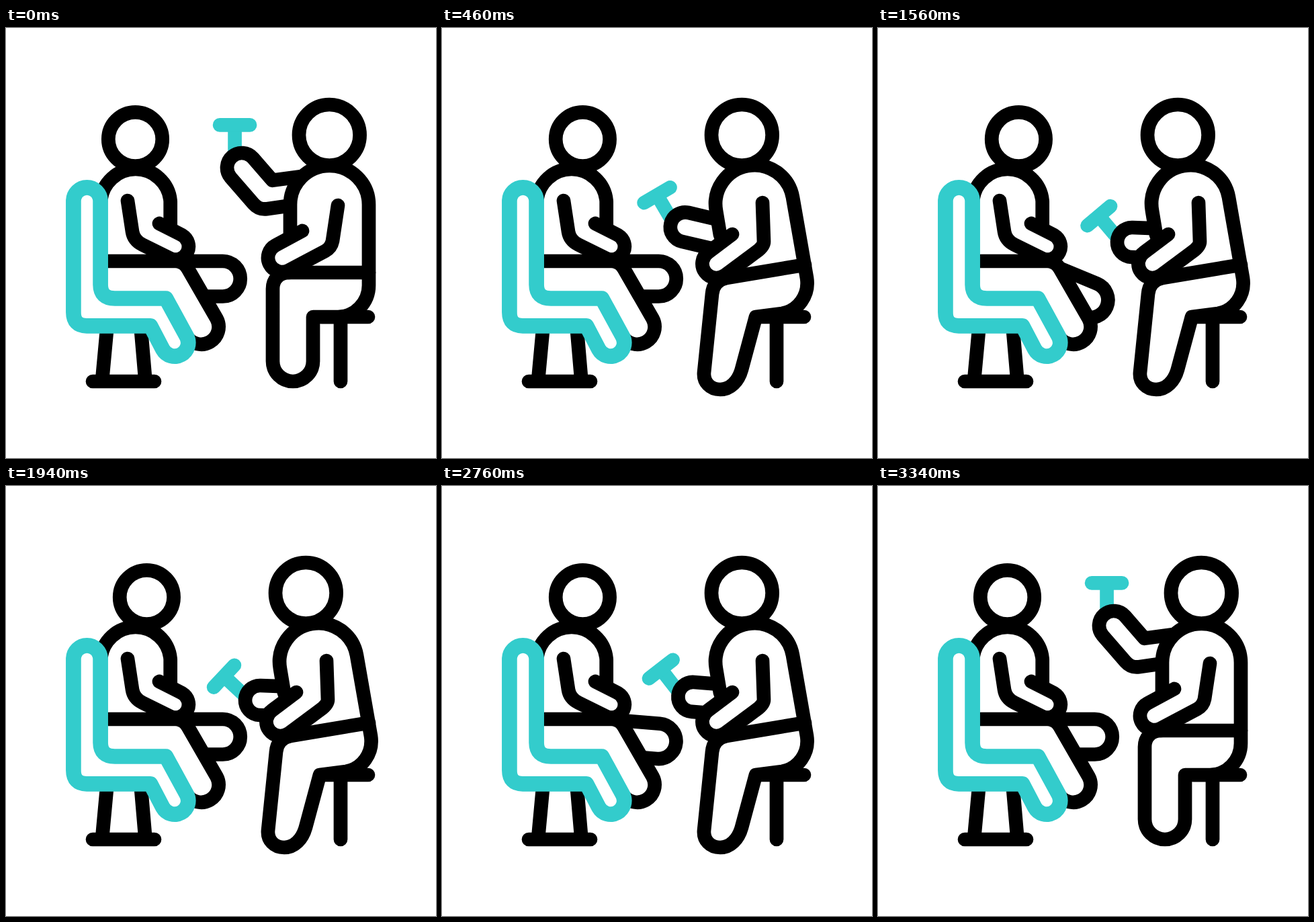
These frames come from a looping animation (640x640 px, 3.6 s). An HTML page:

```html
<!DOCTYPE html>
<html lang="en">
<head>
<meta charset="utf-8">
<title>Knee reflex test</title>
<style>
  html, body { margin: 0; width: 100%; height: 100%; overflow: hidden; background: #fff; }
  svg { display: block; width: 100%; height: 100%; }
  path, circle { fill: #fff; stroke: #000; stroke-width: 20.7; stroke-linecap: round; stroke-linejoin: round; }
  .line { fill: none; }
  .teal { stroke: #3cc; }
  .chair { stroke-width: 22.7; }
  .stem { stroke-linecap: butt; }
</style>
</head>
<body>
<svg viewBox="0 0 640 640">
  <!-- patient -->
  <path class="line" d="M150 450L143.5 520M201 450L207 520M129 526H221"/>
  <path class="line" id="kickLeg" d="M255 347H322.5A26 26 0 0 1 322.5 399.5H270"/>
  <path class="line" d="M141 258A52 52 0 0 1 244.7 258V298"/>
  <path d="M150 347H252Q264 347 270.5 358L313.5 432.5A26 26 0 0 1 268.5 458.5L238 405H150"/>
  <path d="M181 257L188 303Q190 316 203 322.5L245.6 343.5A19.5 19.5 0 0 0 262.4 308.5L228 291"/>
  <circle id="patientHead" cy="165.5" r="40.2"/>
  <path class="teal chair" d="M100.4 257.5A20.1 20.1 0 0 1 140.6 257.5V382Q140.6 402.5 162 402.5H238L268.7 458.7A20.2 20.2 0 0 1 233.3 478.2L215 443.3H120Q100.4 443.3 100.4 423Z"/>
  <!-- doctor -->
  <path class="line" d="M470 430H539M498 430V526"/>
  <g id="hammer">
    <path class="line teal stem" d="M4 -47V0"/>
    <path class="line teal" d="M-18.5 -47H26.5"/>
  </g>
  <path id="farArm"/>
  <path id="body"/>
  <path class="line" id="waist"/>
  <path id="nearArm"/>
  <circle id="doctorHead" cy="159.3" r="45.3"/>
</svg>
<script>
const LOOP = 3600, RETURNED = 3340;
const el = id => document.getElementById(id);
const lerp = (a, b, k) => a + (b - a) * k;

// Upright and leaning versions of each shape share the same commands.
const poses = {
  body: [
    'M423 310L423 263C423 231 449 205 481.5 205C514 205 540 231 540 263L540 383' +
    'C540 409 519 430 494 430L457 430L457 496C457 512.5 443.5 526 427 526' +
    'C410.5 526 397 512.5 397 496L397 388C397 374 407 364 421 364',
    'M414 308L408 272C402.4 240.5 423.5 210.6 455 205C486.5 199.4 516.4 220.5 522 252L543 372' +
    'C547 398 530 421 506 425L467 430L446 508C441 526 429 538 414 538' +
    'C399 538 389 527 390 513L402 396C403 383 410 375 423 372'
  ],
  waist: ['M421 364L540 364', 'M423 372L540 352.5'],
  nearArm: [
    'M494 264L486 317Q484 327 475 332L421 360.6C410.7 366 397.8 362 392.4 351.7' +
    'C387 341.4 391 328.8 401.3 323.4L441 302',
    'M477 260L479 318Q479 325 468 333L421 368C411.4 374.8 398.3 372.7 391.5 363.3' +
    'C384.7 353.9 386.6 340.8 396 334L432 307'
  ]
};

function morph([from, to], k) {
  const target = to.match(/[\d.]+/g);
  let i = 0;
  return from.replace(/[\d.]+/g, n => lerp(+n, +target[i++], k).toFixed(2));
}

function ease(x) {
  x = Math.max(0, Math.min(1, x));
  return x * x * (3 - 2 * x);
}

function swing(t, start, duration) {
  const x = (t - start) / duration;
  return x > 0 && x < 1 ? Math.sin(Math.PI * x) ** 2 : 0;
}

function drawArm(reach, strike) {
  const turn = reach ** 1.2;
  const x = lerp(351, 378, reach ** 4), y = lerp(208, 319, reach);
  const angle = lerp(49, 2, turn) * Math.PI / 180;
  const c = Math.cos(angle), s = Math.sin(angle);
  const at = (u, v) => `${x + u * c - v * s} ${y + u * s + v * c} `;
  el('farArm').setAttribute('d',
    `M${at(44, -22)}m45 -6l-45 6L${at(0, -22)}A22 22 0 0 0 ${at(0, 22)}` +
    `L${at(52, 22)}Q${at(64, 22)}${x + 64 * c - 22 * s + 12} ${y + 64 * s + 22 * c - 1.5}l35 -5`);
  el('hammer').setAttribute('transform',
    `translate(${at(-22, 0)}) rotate(${-40 * turn - 37 * strike})`);
}

function draw(now) {
  const t = now % LOOP;
  const away = Math.max(0, Math.min(t, RETURNED - t));
  const lean = ease(away / 460);
  const strike = (swing(t, 720, 960) + swing(t, 1680, 960)) ** 3;
  const kick = 25 * (swing(t, 1140, 700) + swing(t, 2160, 700));

  for (const id in poses) el(id).setAttribute('d', morph(poses[id], lean));
  el('doctorHead').setAttribute('cx', lerp(481.3, 446.3, lean));
  el('patientHead').setAttribute('cx', lerp(192.5, 209.4, lean));
  el('kickLeg').setAttribute('transform', `rotate(${kick} 240 373)`);
  drawArm(ease((away / 675) ** 0.9), strike);
  requestAnimationFrame(() => draw(performance.now()));
}
draw(performance.now());
</script>
</body>
</html>
```
